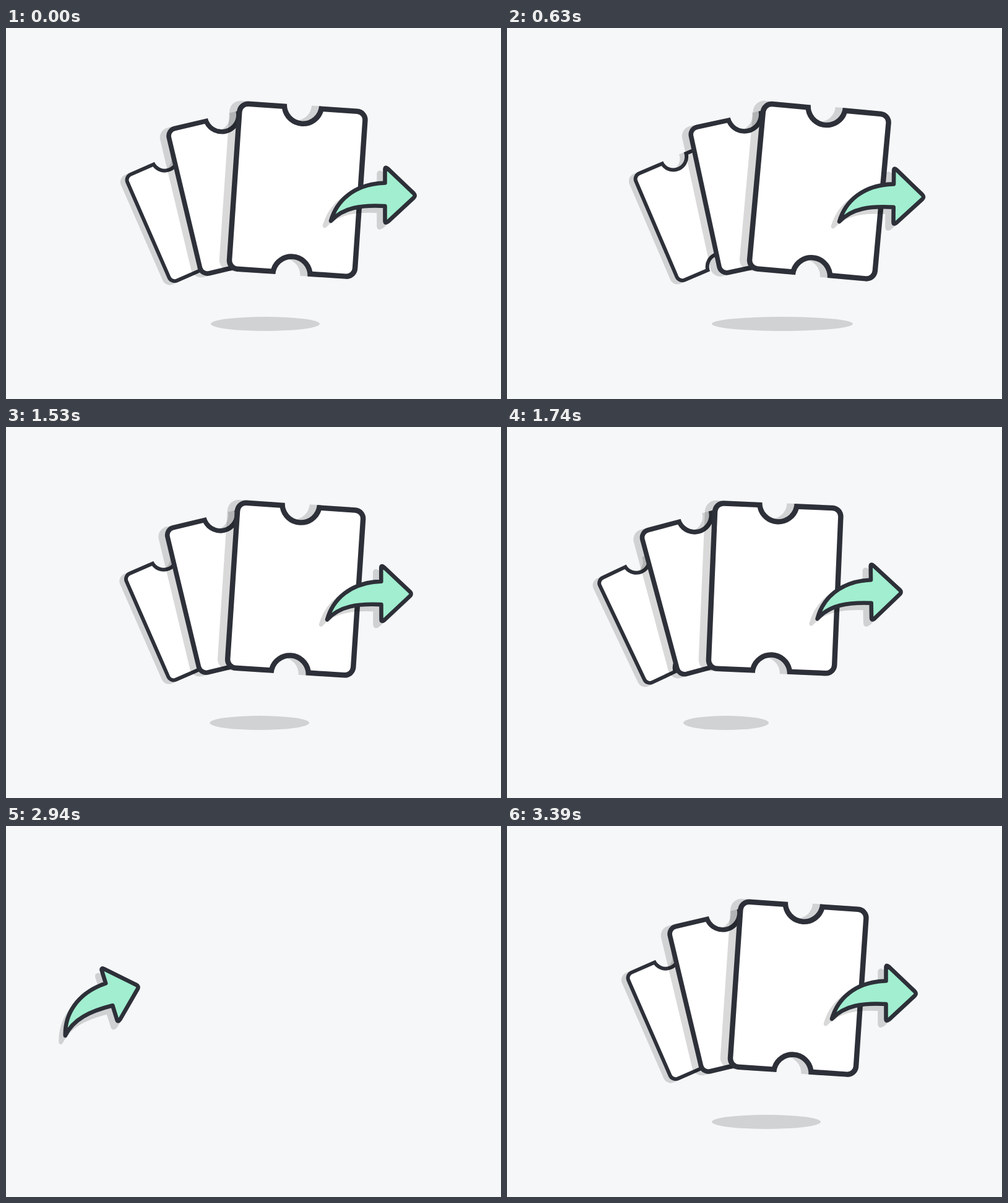
An HTML page that plays this animation: 800 by 600 pixels, repeating every 3930 ms.

```html
<!DOCTYPE html>
<html lang="en">
<head>
<meta charset="utf-8">
<title>Ticket fan</title>
<style>
  html, body { margin: 0; width: 100%; height: 100%; overflow: hidden; background: #f6f7f9; }
  svg { display: block; width: 800px; height: 600px; }
  .shade { opacity: .15; }
  .ink { fill: #2d3038; }
  .paper { fill: #fff; }
  .arrow { fill: #a1eed0; stroke: #2d3038; stroke-width: 6.6; stroke-linejoin: round; }
  .shade .arrow { fill: #000; stroke: #000; }
</style>
</head>
<body>
<svg viewBox="0 0 800 600">
  <defs>
    <path id="outer"/>
    <path id="inner"/>
    <g id="ticket">
      <use href="#outer" x="-12" class="shade"/>
      <use href="#outer" class="ink"/>
      <use href="#inner" class="paper"/>
    </g>
    <path id="arrowShape" d="M525 312C534 280 562 252 612.5 250.5V229Q612.5 223.5 617 227.5L659 267.5
      Q662.500 271 659 274.500L617.500 313Q612.500 317 612.500 312V288C575 286 545 290 525 312Z"/>
  </defs>
  <ellipse id="ground" class="shade" cy="478.5" ry="11.5"/>
  <g id="back"><use href="#ticket" transform="translate(295.2 298) rotate(-23.6) scale(.7)"/></g>
  <g id="middle"><use href="#ticket" transform="translate(377.5 261.3) rotate(-13.4) scale(.9)"/></g>
  <g id="front"><use href="#ticket" transform="translate(470.7 262.2) rotate(3.9)"/></g>
  <g id="arrow">
    <g class="shade"><use href="#arrowShape" class="arrow" x="-10" y="8"/></g>
    <use href="#arrowShape" class="arrow"/>
  </g>
</svg>
<script>
const LOOP = 3930, STEP = 30, SWING = 30;
const $ = id => document.getElementById(id);
const clamp = x => Math.max(0, Math.min(1, x));
const backIn = (u, s) => u * u * ((s + 1) * u - s);

// Ticket outline, inset by i, with a round notch at top and bottom
function ticket(i) {
  const w = 106 - i, h = 138 - i, r = 18 - i, n = 26 + i;
  const c = Math.sqrt(n * n - i * i);
  const corner = (x, y) => `A${r} ${r} 0 0 1 ${x} ${y}`;
  const notch = (x, y) => `A${n} ${n} 0 0 0 ${x} ${y}`;
  return `M${r - w} ${-h}H${-c}${notch(c, -h)}H${w - r}${corner(w, r - h)}V${h - r}` +
    `${corner(w - r, h)}H${c}${notch(-c, h)}H${r - w}${corner(-w, h - r)}V${r - h}${corner(r - w, -h)}Z`;
}
$('outer').setAttribute('d', ticket(0));
$('inner').setAttribute('d', ticket(8.5));

// Start times of hop, exit and entry; amp is the hop angle in degrees
const parts = [
  { id: 'arrow',  hop: 395, amp: 1.75, exit: 1501, enter: 2898 },
  { id: 'front',  hop: 457, amp: 1.46, exit: 1510, enter: 2982 },
  { id: 'middle', hop: 519, amp: 1.41, exit: 1513, enter: 3030 },
  { id: 'back',   hop: 581, amp: 1.75, exit: 1516, enter: 3049 }
];

function angle(t, p) {
  if (t > 2500) return -SWING * backIn(1 - clamp((t - p.enter) / 326), .9);
  if (t > p.exit) return SWING * backIn(clamp((t - p.exit) / 400), 1.70158);
  return p.amp * (1 - Math.cos(2 * Math.PI * clamp((t - p.hop) / 285))) / 2;
}

const linear = u => u;
const easeIn = u => u * u;
const easeOut = u => u * (2 - u);
const smooth = u => u * u * (3 - 2 * u);

// Keys: time, value, easing towards the next key
const left = [
  [0, 331], [630, 331, smooth], [740, 350, smooth], [855, 330], [1515, 330, smooth],
  [1740, 285, easeIn], [2070, 820], [2070, -260], [2925, -260, linear], [3120, -60, easeOut], [3390, 331]
];
const right = [
  [0, 507], [405, 507, smooth], [630, 559, smooth], [855, 491], [1515, 491, smooth],
  [1740, 423, easeIn], [2070, 1050], [2070, -200], [2925, -200, linear], [3120, 278, easeOut], [3390, 507]
];

function track(t, keys) {
  const i = keys.findLastIndex(k => t >= k[0]);
  const [t0, v0, ease] = keys[i];
  if (!ease) return v0;
  const [t1, v1] = keys[i + 1];
  return v0 + (v1 - v0) * ease((t - t0) / (t1 - t0));
}

const start = performance.now();
function draw() {
  const t = Math.floor((performance.now() - start) % LOOP / STEP) * STEP;
  for (const p of parts) $(p.id).setAttribute('transform', `rotate(${angle(t, p)} 400 1745)`);
  const a = track(t, left), b = track(t, right);
  $('ground').setAttribute('cx', (a + b) / 2);
  $('ground').setAttribute('rx', (b - a) / 2);
  requestAnimationFrame(draw);
}
draw();
</script>
</body>
</html>
```
